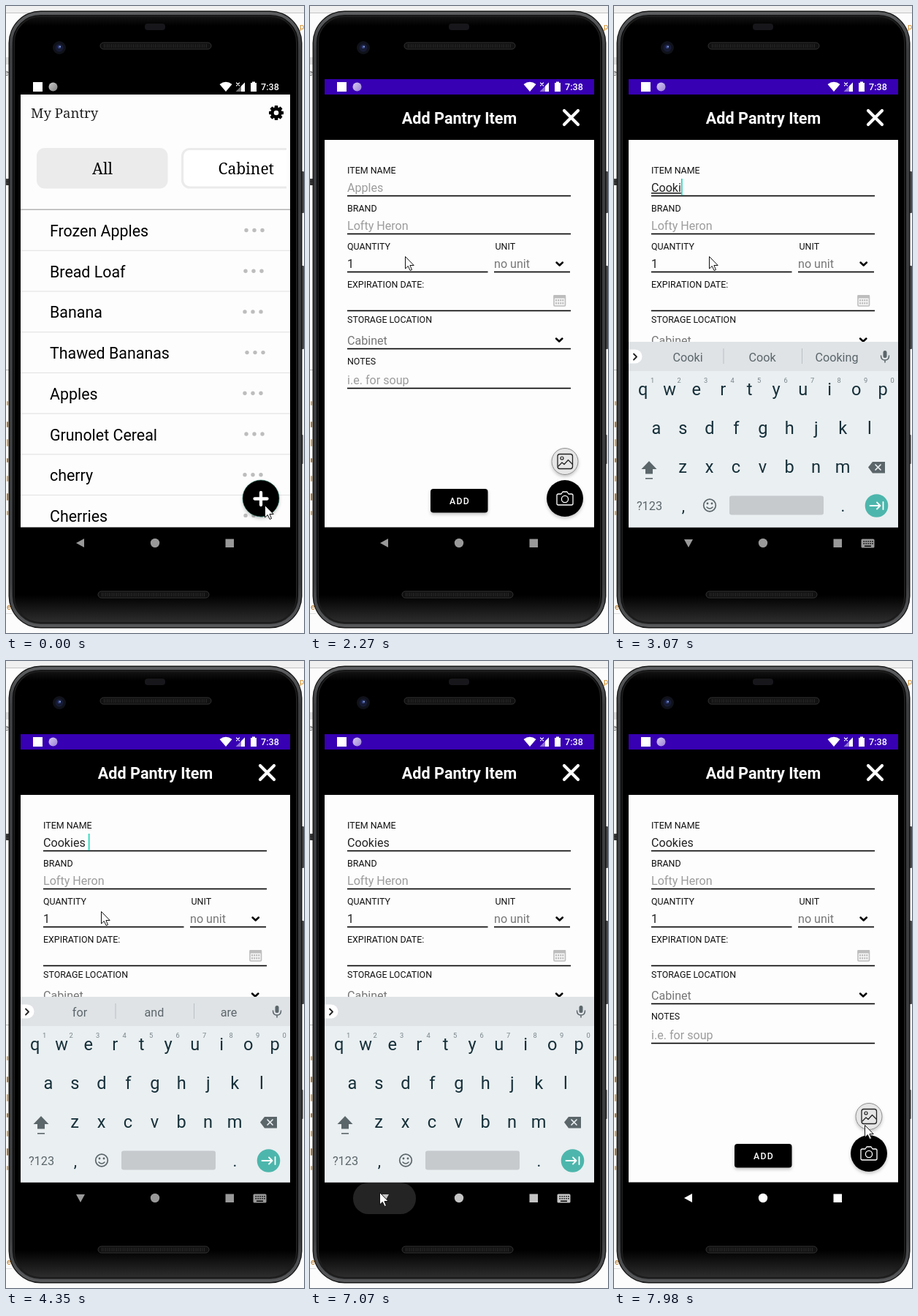
Write an HTML page that moves like this. It is 408 px wide and 857 px high and loops after 8000 ms.

```html
<!DOCTYPE html>
<html lang="en">
<head>
<meta charset="utf-8">
<title>Pantry app</title>
<style>
  html, body { margin: 0; width: 100%; height: 100%; overflow: hidden; background: #fff; }
  svg { display: block; width: 408px; height: 857px; font-family: Roboto, sans-serif; }
  text { white-space: pre; }
  .serif { font-family: "Noto Serif", serif; }
  .line { fill: none; stroke-linecap: round; stroke-linejoin: round; }
</style>
</head>
<body>
<svg id="stage" viewBox="0 0 408 857" xmlns="http://www.w3.org/2000/svg"></svg>
<script>
const LOOP = 8000;
const stage = document.getElementById('stage');

const rect = (x, y, w, h, fill, rx = 0, more = '') =>
  `<rect x="${x}" y="${y}" width="${w}" height="${h}" rx="${rx}" fill="${fill}" ${more}/>`;
const circle = (x, y, r, fill, more = '') =>
  `<circle cx="${x}" cy="${y}" r="${r}" fill="${fill}" ${more}/>`;
const text = (x, y, size, str, fill = '#000', more = '') =>
  `<text x="${x}" y="${y}" font-size="${size}" fill="${fill}" ${more}>${str}</text>`;
const mid = (x, y, size, str, fill, more = '') =>
  text(x, y, size, str, fill, `text-anchor="middle" ${more}`);
const path = (d, fill, more = '') => `<path d="${d}" fill="${fill}" ${more}/>`;
const line = (d, color, width) =>
  `<path class="line" d="${d}" stroke="${color}" stroke-width="${width}"/>`;
const group = (id, body, more = '') => `<g id="${id}" ${more}>${body}</g>`;

function desktop() {
  const specks = [540, 568, 592, 618, 642, 666, 690]
    .map((y, i) => rect(1, y, 2, 6 + i % 3 * 2, i % 2 ? '#b8741a' : '#e0a040', 1)).join('');
  return rect(0, 0, 408, 857, '#fcfcfc') + rect(0, 0, 408, 10, '#f0f0f0') +
    rect(0, 9, 408, 1, '#c4c4c4') + rect(0, 70, 8, 10, '#ddd') + rect(0, 497, 8, 1, '#bbb') +
    rect(0, 830, 8, 1, '#ddd') + rect(0, 236, 6, 9, '#444') + specks +
    text(-2, 95, 11, 'e', '#555') + text(0, 245, 11, 't', '#222') +
    text(1, 825, 11, 'e', '#b8741a') + text(402, 32, 11, 'p', '#d08a20');
}

function speaker(x, y) {
  return rect(x, y, 152, 9, '#111', 4.5, 'stroke="#333"') +
    `<path d="M${x + 5} ${y + 4.5}h142" stroke="#2a2a2a" stroke-width="5" stroke-dasharray="1 1.5"/>`;
}

function phone() {
  return rect(402, 226, 6, 57, '#484848', 1) + rect(402, 355, 6, 114, '#484848', 1) +
    rect(402, 586, 5, 40, '#777', 1) +
    rect(3.5, 6.5, 402, 844, '#151515', 44) +
    rect(7, 10, 395, 837, 'url(#face)', 40, 'stroke="url(#rim)" stroke-width="4"') +
    rect(11, 14, 387, 829, 'none', 36, 'stroke="#1c1c1c" stroke-width="2"') +
    rect(20, 100, 369, 660, '#000') +
    rect(190, 24, 28, 9, '#17171b', 4) + speaker(129, 50) + speaker(126, 800) +
    circle(73, 57, 9, '#10121a') + circle(73, 57, 5.5, '#171b33') +
    circle(73, 56, 2.2, '#34437f') + circle(74, 55.5, .9, '#9fb2e0');
}

function statusIcons() {
  return rect(37, 104, 13, 13, '#fff') + circle(64.5, 110.5, 6, 'url(#orb)') +
    path('M292.5 107Q301 100.5 309.5 107L301 117Z', '#fff') +
    path('M327 104.5V117H314.5Z', '#fff', 'opacity=".45"') + path('M327 104.5V117H322V109.5Z', '#fff') +
    line('M315.5 105l4 4m0-4l-4 4', '#fff', 1.1) +
    path('M335 105h2v-1.5h4v1.5h2v12h-8z', '#fff') +
    text(349, 115, 12.6, '7:38', '#fff', 'font-weight="500"');
}

function gear(x, y) {
  const teeth = Array.from({ length: 8 }, (_, i) =>
    rect(x - 2.3, y - 10, 4.6, 5, '#000', .8, `transform="rotate(${i * 45} ${x} ${y})"`)).join('');
  return teeth + circle(x, y, 5.5, 'none', 'stroke="#000" stroke-width="4.4"');
}

function listScreen() {
  const items = ['Frozen Apples', 'Bread Loaf', 'Banana', 'Thawed Bananas', 'Apples',
    'Grunolet Cereal', 'cherry', 'Cherries'];
  const dotShift = [2, 1, 0, 3, 0, 2, 0, 1];
  const rows = items.map((name, i) => {
    const y = i * 55.7, x = 338 + dotShift[i];
    return text(60, 315, 21.4, name, '#000', `transform="translate(0 ${y})"`) +
      [-11, 0, 11].map(d => circle(x + d, 306.5 + y, 2.7, '#bdbdbd')).join('') +
      rect(20, 333.7 + y, 369, 1.2, '#e4e4e4');
  }).join('');
  return rect(20, 121, 369, 591.5, '#fdfdfd') +
    text(34, 153, 18.6, 'My Pantry', '#222', 'class="serif"') + gear(370, 146) +
    rect(42, 194, 179.5, 55.5, '#ebebeb', 11) + mid(132, 230, 21, 'All', '#000', 'class="serif"') +
    `<g clip-path="url(#tabs)">${rect(241.5, 195.5, 180, 52.5, '#fff', 10, 'stroke="#ebebeb" stroke-width="3.2"')}</g>` +
    text(290.5, 230, 21, 'Cabinet', '#000', 'class="serif"') +
    rect(20, 277.5, 369, 1.5, '#b4b4b4') +
    `<g clip-path="url(#page)">${rows}</g>` +
    circle(349, 673, 25, '#000', 'filter="url(#shadow)" stroke="#1d6b58" stroke-width=".6"') +
    circle(349, 673, 25, '#fff', 'id="press" opacity="0"') +
    line('M340.5 673.5h17m-8.5-8.5v17', '#fff', 4.3);
}

function formScreen() {
  const labels = [[51, 228.5, 'ITEM NAME'], [51, 280.5, 'BRAND'], [51, 333, 'QUANTITY'], [253.5, 333, 'UNIT'],
    [51, 385, 'EXPIRATION DATE:'], [51, 433, 'STORAGE LOCATION'], [51, 490, 'NOTES']];
  const rules = [[51, 259, 306], [51, 311, 306], [51, 363, 192.5], [252, 363, 104], [51, 416, 306], [51, 468, 306], [51, 522, 306]];
  const hint = (x, y, str, fill = '#9c9c9c') => text(x, y, 16.1, str, fill);
  const cells = [0, 1, 2, 3, 4, 5, 6, 7].map(i =>
    rect(336 + i % 4 * 3.1, 401 + (i >> 2) * 4, 2, 2.5, '#bdbdbd')).join('');
  return rect(20, 100, 369, 21, '#3700b3') + rect(20, 121, 369, 62, '#000') +
    rect(20, 183, 369, 529.5, '#fdfdfd') +
    mid(204.5, 161, 21.6, 'Add Pantry Item', '#fff', 'font-weight="700"') +
    line('M348 143l19 19m0-19l-19 19', '#fff', 4.2) +
    labels.map(([x, y, s]) => text(x, y, 12.45, s, '#111')).join('') +
    rules.map(([x, y, w]) => rect(x, y - .3, w, 1.6, '#000')).join('') +
    text(51, 254, 16.1, '', '#222', 'id="name"') + rect(51, 236, 1.8, 23, '#2bd5bb', 0, 'id="caret"') +
    hint(51, 306, 'Lofty Heron') + hint(51, 358, '1', '#222') + hint(252, 358, 'no unit', '#777') +
    hint(51, 463, 'Cabinet', '#777') + hint(51, 517, 'i.e. for soup') +
    line('M337.5 350.5l4.2 4 4.2-4M337 454.5l4.2 4 4.2-4', '#000', 2.5) +
    rect(334, 396, 15.5, 14, '#f6f6f6', 1, 'stroke="#bdbdbd" stroke-width="1.6"') +
    rect(333.5, 395, 16.5, 4.5, '#bdbdbd') + cells +
    rect(165, 660, 78.5, 32.5, '#000', 4, 'filter="url(#shadow)"') +
    mid(205, 681.3, 12.3, 'ADD', '#fff', 'font-weight="500" letter-spacing="1.2"') +
    circle(349, 622.5, 18, '#e6e6e6', 'filter="url(#shadow)" stroke="#777" stroke-width=".8"') +
    rect(339, 612.5, 20.5, 20, 'none', 3, 'stroke="#222" stroke-width="1.3"') +
    circle(345, 618, 2, 'none', 'stroke="#222" stroke-width="1.2"') +
    line('M340 629l5-5 3 2.5 5.5-6 6 6', '#222', 1.3) +
    circle(349, 673, 25, '#000', 'filter="url(#shadow)"') +
    line('M340 667h4l2-3h6l2 3h4q2 0 2 2v11q0 2-2 2h-18q-2 0-2-2v-11q0-2 2-2z', '#fff', 1.3) +
    circle(349, 674, 4.6, 'none', 'stroke="#fff" stroke-width="1.3"');
}

function keyboard() {
  const ink = '#16303a', grey = '#5b666b';
  const keys = (row, x, y) => [...row].map((c, i) => mid(x + i * 36.5, y, 23.6, c, ink)).join('');
  const digits = [...'1234567890'].map((d, i) => mid(52.5 + i * 36.5, 515, 9.3, d, '#78848a')).join('');
  const words = [101, 203, 305].map((x, i) => mid(x, 486, 16.2, '', grey, `id="word${i}"`)).join('');
  return rect(20, 459, 369, 253.5, '#eaeff1') + rect(20, 459, 369, 40, '#dfe3e6') +
    path('M20 469.5h9a9.5 9.5 0 0 1 0 19h-9z', '#fff') + line('M27 475.5l4 4-4 4', '#222', 1.8) +
    group('words', words + rect(149.5, 468, 1, 21, '#b9c0c4') + rect(257, 468, 1, 21, '#b9c0c4')) +
    rect(368.5, 471, 5, 10, grey, 2.5) + line('M365.5 478q0 6 5.5 6t5.5-6M371 484v3', grey, 1.5) +
    keys('qwertyuiop', 39.7, 532) + digits + keys('asdfghjkl', 57.8, 585.2) + keys('zxcvbnm', 94, 638.4) +
    path('M48 622l10.5 11h-5.5v6.5h-10v-6.5h-5.5z', grey) + rect(43, 645, 10, 1.6, grey) +
    path('M348 630.5l6-7.5h17v15.5h-17z', grey) + line('M358 627l7 7m0-7l-7 7', '#eaeff1', 1.7) +
    mid(48.5, 688.5, 16.3, '?123', grey) + mid(95, 691, 22, ',', ink) + mid(313.5, 691, 22, '.', ink) +
    circle(131, 682.5, 8.3, 'none', `stroke="${grey}" stroke-width="1.7"`) +
    circle(128, 680, 1.4, grey) + circle(134, 680, 1.4, grey) + line('M127 685q4 4 8 0', grey, 1.6) +
    rect(158, 669.5, 129, 26, '#c6cacd', 3) + circle(359.5, 683, 15.8, '#4db6ac') +
    line('M350.5 683h14m-4.5-4.5l4.5 4.5-4.5 4.5M368.5 678v10', '#fff', 1.8);
}

function navBar() {
  const dots = [0, 1, 2, 3, 4, 5, 6, 7, 8, 9].map(i =>
    rect(341.5 + i % 5 * 2.9, 731 + (i > 4) * 3, 1.5, 1.5, '#000')).join('');
  return rect(59, 713, 86, 43, '#242424', 21, 'id="ripple"') +
    group('nav', '<path id="back" d="M96 734l11-6v12z"/>' +
      '<circle cx="204" cy="734" r="6.2"/><rect x="300.5" y="728.5" width="11.5" height="11.5"/>' +
      group('imeIcon', '<rect x="338.5" y="728.5" width="18" height="12" rx="1.5"/>' + dots +
        rect(343, 737.5, 9, 1.5, '#000')));
}

stage.innerHTML = `<defs>
  <linearGradient id="rim" x2="0" y2="1"><stop stop-color="#5c5e60"/><stop offset=".06" stop-color="#3c3e40"/>
    <stop offset=".93" stop-color="#3c3e40"/><stop offset="1" stop-color="#56585a"/></linearGradient>
  <linearGradient id="face" x2="0" y2="1"><stop stop-color="#1a1a1a"/><stop offset=".02" stop-color="#000"/>
    <stop offset=".95" stop-color="#000"/><stop offset="1" stop-color="#333"/></linearGradient>
  <linearGradient id="orb" x2="1" y2="1"><stop stop-color="#fff" stop-opacity=".8"/><stop offset="1" stop-color="#fff" stop-opacity=".5"/></linearGradient>
  <filter id="shadow" x="-30%" y="-30%" width="160%" height="170%"><feDropShadow dx="0" dy="2.5" stdDeviation="2" flood-opacity=".22"/></filter>
  <clipPath id="tabs"><rect x="20" y="121" width="364" height="150"/></clipPath>
  <clipPath id="page"><rect x="20" y="121" width="369" height="591.5"/></clipPath></defs>` +
  desktop() + phone() + group('list', listScreen()) + group('form', formScreen()) + statusIcons() +
  navBar() + group('kb', keyboard()) +
  group('mouse', path('M0 0V16.5L3.8 13L6.6 19L9 18L6.4 12H11.7Z', '#fff', 'stroke="#111"'));

const $ = id => document.getElementById(id);

// Each track is a list of [start time, value].
const typed = [[0, ''], [2450, 'C'], [2510, 'Co'], [2940, 'Coo'], [3010, 'Cook'], [3070, 'Cooki'],
  [3180, 'Cookies'], [3360, 'Cookies ']];
const suggested = [[0, 'C|Can|Could'], [2510, 'Co|Could|Come'], [2940, 'Coo|Cool|Cook'], [3010, 'Cook|Cooking|Cooked'],
  [3070, 'Cooki|Cook|Cooking'], [3180, 'Cookies|Cookie|Cooking'], [3360, 'for|and|are'], [7010, '']];
const caretOn = [[0, 1], [1360, 0], [1840, 1], [2270, 0], [2450, 1], [3920, 0], [4350, 1], [4910, 0],
  [5410, 1], [5870, 0], [6360, 1], [6830, 0], [7330, 1], [7860, 0]];
const kbShown = [[0, 0], [2450, .25], [2510, .66], [2570, .9], [2630, 1], [7270, .8], [7330, .45], [7390, .12], [7450, 0]];
const pressed = [[0, 0], [500, .12], [560, .24], [740, .12], [800, 0]];
const rippleShown = [[0, 0], [7010, .5], [7070, 1], [7270, .7], [7330, .35], [7390, 0]];
const navColor = [[0, '#999'], [7010, '#aaa'], [7070, '#c4c4c4'], [7270, '#e0e0e0'], [7330, '#fff']];
const moves = [
  { start: 1360, end: 1650, steps: 5, points: [[354, 682], [130, 342]] },
  { start: 6180, end: 6950, steps: 14,
    points: [[130, 342], [178, 410], [185, 490], [140, 620], [88, 700], [80, 721], [95, 726]] },
  { start: 7270, end: 7980, steps: 13, points: [[95, 727], [343, 634]] },
];

const at = (track, t) => track.reduce((value, [start, v]) => t >= start ? v : value, track[0][1]);

function along(points, p) {
  const s = p * (points.length - 1), i = Math.min(Math.floor(s), points.length - 2);
  return points[i].map((v, k) => v + (points[i + 1][k] - v) * (s - i));
}

function mouseAt(t) {
  const move = moves.filter(m => t >= m.start).pop();
  if (!move) return moves[0].points[0];
  const { start, end, steps, points } = move;
  const done = Math.floor((t - start) / (end - start) * (steps - 1)) + 1;
  const p = Math.min(1, done / steps);
  return along(points, p * p * (3 - 2 * p));
}

const show = (id, on) => $(id).style.display = on ? '' : 'none';

function draw(t) {
  const adding = t >= 1040, name = at(typed, t), shown = at(kbShown, t);
  show('list', !adding);
  show('form', adding);
  $('press').setAttribute('opacity', at(pressed, t));

  const field = $('name');
  field.textContent = name || 'Apples';
  field.setAttribute('fill', name ? '#222' : '#9c9c9c');
  field.style.textDecoration = name && t < 3360 ? 'underline' : 'none';
  const caretX = 51 + (name && adding ? field.getComputedTextLength() : 0);
  $('caret').setAttribute('x', caretX);
  show('caret', at(caretOn, t));

  const words = at(suggested, t);
  show('words', words);
  words.split('|').forEach((w, i) => $('word' + i).textContent = w);
  $('kb').setAttribute('opacity', shown);
  $('kb').setAttribute('transform', `translate(0 ${Math.round((1 - shown) * 68)})`);

  $('nav').setAttribute('fill', at(navColor, t));
  $('back').setAttribute('transform', shown ? 'rotate(-90 102 734)' : '');
  show('imeIcon', shown);
  $('ripple').setAttribute('opacity', at(rippleShown, t));
  $('mouse').setAttribute('transform', `translate(${mouseAt(t).map(v => Math.round(v) + .5).join(' ')})`);
}

const begin = performance.now();
function tick() {
  draw((performance.now() - begin) % LOOP);
  requestAnimationFrame(tick);
}
tick();
</script>
</body>
</html>
```
